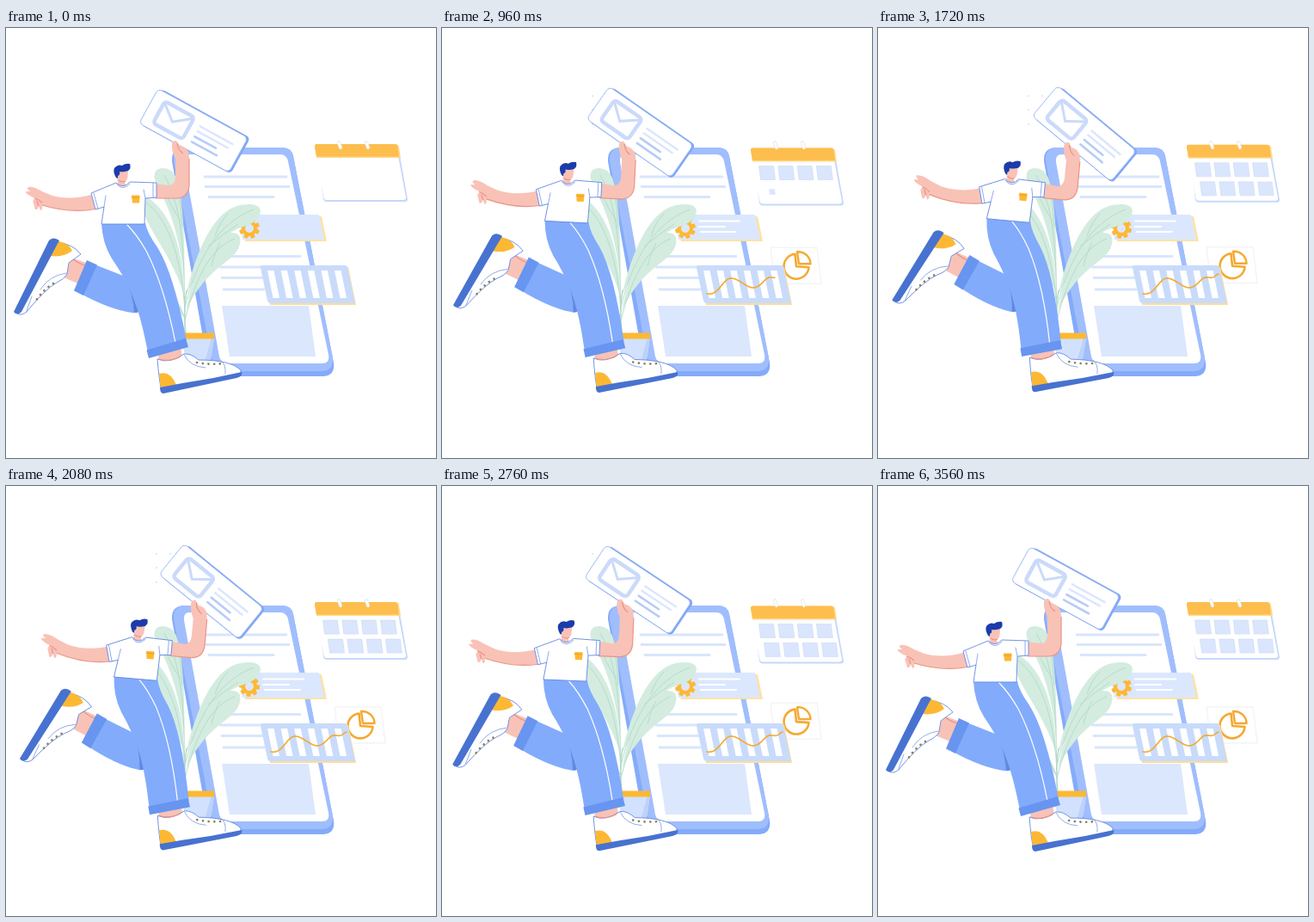
An HTML page that plays this animation: 500 px wide and 500 px high, repeating every 3.6 s.

```html
<!DOCTYPE html>
<html lang="en">
<head>
<meta charset="utf-8">
<title>Mobile planner</title>
<style>
html,body{margin:0;width:100%;height:100%;overflow:hidden;background:#fff}
svg{display:block;width:500px;height:500px}
.skin{fill:#f9c2b7}
.shade{fill:none;stroke:#ea9487;stroke-width:1.2}
.ink{stroke:#6489e2;stroke-width:.9;stroke-linejoin:round}
.white{fill:#fff}
.pants{fill:#82abfc}
.cuff{fill:#6795f0}
.sole{fill:#4872d0}
.gold{fill:#fdb833}
.line{fill:none;stroke-linecap:round}
.gold-line{fill:none;stroke:#f5a931;stroke-linejoin:round;stroke-linecap:round}
.leaf{fill:#d3ecdf}
.vein{fill:none;stroke:#b3dac9;stroke-width:.9}
.lace{fill:none;stroke:#8a7d57;stroke-width:2.6;stroke-linecap:round;stroke-dasharray:.1 6.6}
</style>
</head>
<body>
<svg viewBox="0 0 500 500">
  <!-- phone -->
  <path fill="#84abfa" d="M206 139H321Q332 139 334 149L381 389Q383 404 369 405H250Q237 405 235 394L193 155Q192 140 206 139Z"/>
  <path fill="#a0befd" d="M206 139H321Q332 139 334 149L380 384Q381 398 368 399H254Q242 399 240 388L195 155Q194 141 206 139Z"/>
  <path class="white" d="M212 147H319Q326 147 328 155L375 380Q377 390 367 390H258Q250 390 248 382L207 156Q206 148 212 147Z"/>
  <path class="line" stroke="#d9e5fc" stroke-width="2.8" d="M231 173H326M232 184.500H329M236 196.500H311M249 265.500H342M249 278H298M251 290.500H300M253 304H300"/>
  <path fill="#dbe7fd" d="M251 323H352L360 382H260Z"/>

  <!-- settings card -->
  <path fill="#ffe1a6" d="M272 219H367L373 248H278Z"/>
  <path fill="#dbe7fe" d="M270 217H364L370 246H275Z"/>
  <g id="notes" class="line" stroke="#fff" stroke-width="2.200"></g>
  <g id="gear"></g>

  <!-- pie card -->
  <g id="pie">
    <path class="white" stroke="#ececf1" stroke-width=".8" d="M382 257H436L441 299H387Z"/>
    <path class="gold-line" stroke-width="2.600" d="M410.500 264.500A14.500 14.500 0 1 0 426.500 280L412 279Z"/>
    <path class="gold-line" stroke-width="2.400" d="M413 262A14.500 14.500 0 0 1 428.500 276H415Z"/>
  </g>

  <!-- chart card -->
  <path fill="#ffdc98" d="M299 278H398L407 322H307Z"/>
  <path fill="#c9dbfb" d="M298 276H394Q396 276 397 278L406 320H307Q305 320 304 317L296 279Q296 276 298 276Z"/>
  <g id="bars" class="white"></g>
  <path id="curve" class="gold-line" stroke-width="1.700" pathLength="100" d="M308 309C323 312 326 290 337 291S353 303 363 302 375 288 384 290 391 287 396 286"/>

  <!-- calendar -->
  <g id="calendar">
    <path fill="#c7d8fb" d="M361 137H456L467 199Q467 202 464 202H373Q370 202 369 199Z"/>
    <path class="white" d="M360 149H456L465 197Q465 200 462 200H373Q370 200 369.500 197Z"/>
    <path fill="#ffd98f" d="M361 135H453Q456 135 457 138L459 151H361L359 138Q359 135 361 135Z"/>
    <path fill="#fdbe4d" d="M361 135H452Q455 135 455.500 138L457 149.500H361L359 138Q359 135 361 135Z"/>
    <g id="cells" fill="#dae6fd" stroke="#d0dcf5" stroke-width=".7"></g>
  </g>
  <path class="line" stroke="#e8e3da" stroke-width="4.200" d="M387 133.500L389 139M419 133.500L421 139"/>
  <path class="line" stroke="#fff" stroke-width="2.800" d="M387 133.500L389 139M419 133.500L421 139"/>

  <!-- plant -->
  <path class="leaf" d="M208 300C207 275 209 205 198 174Q191 160 177 164Q169 169 175 181C188 207 202 235 208 300Z"/>
  <path class="leaf" d="M207 310C207 262 193 216 166 198Q157 194 158 206C162 232 192 262 207 310Z"/>
  <path class="leaf" d="M208 338C204 322 199 314 188 306Q183 307 187 314C191 322 201 328 208 338Z"/>
  <path class="leaf" d="M209 312C220 262 241 212 272 206Q295 202 296 213Q294 226 276 231C250 239 231 264 209 312Z"/>
  <path class="leaf" d="M209 330C219 280 232 244 260 238Q275 237 272 251C267 274 234 274 209 330Z"/>
  <path class="vein" d="M208 355C207 270 208 215 184 171M208 330C204 260 186 220 163 203M208 338Q200 317 188 308M208 325C222 265 250 225 288 211M208 340C222 285 240 255 266 245M243 242Q248 226 258 216M235 254Q252 240 270 228M239 277Q243 260 249 250M204 232Q205 210 201 196M203 224Q192 208 187 195"/>
  <path class="line" stroke="#b3dac9" stroke-width="1.400" d="M209 356Q206 325 210 305"/>
  <path fill="#d2e1fd" d="M204 360H242L237 392H210Z"/>
  <path fill="#bdd2fb" d="M239 360H242L237 392H230Z"/>
  <path class="gold" d="M201 354.500H242V361.500H203Z"/>

  <g id="dots" fill="#a9bce8"></g>

  <g id="body">
    <!-- trailing leg -->
    <g id="trail">
      <path class="skin" d="M76 267L96 274 88 299 67 290Z"/>
      <path class="shade" d="M76 267Q82 273 94 277"/>
      <path class="pants" d="M103 275L136 288 152 304 156 324Q156 333 146 331Q120 327 87 309Z"/>
      <path fill="#6089df" d="M138 289L152 303 156 324Q156 332 149 331Q148 310 138 289Z"/>
      <path class="cuff" d="M94 270L106 275.500 90 311 79 305.500Z"/>
      <path class="white ink" d="M59 249Q78 251 87 263L73 273 71 286Q68 292 59 296Q45 304 24 330Q18 335 13 332Z"/>
      <path class="gold" d="M61 248Q73 250 77 259Q67 267 52 265Z"/>
      <path class="sole" d="M50 247Q55 242 62 247L18 330Q13 335 9 330Z"/>
      <path class="lace" d="M55 297Q42 305 33 320"/>
      <path class="line" stroke="#6489e2" stroke-width=".7" d="M70 285Q50 288 40 304M24 329L30 312"/>
    </g>

    <!-- mail card -->
    <g id="mail">
      <rect x="-57" y="-24.500" width="118.500" height="48" rx="5" fill="#82a8f4"/>
      <rect x="-60" y="-23" width="119" height="46" rx="5" class="white" stroke="#8fb0f5" stroke-width=".8"/>
      <rect x="-46" y="-14" width="39" height="29" rx="4" fill="none" stroke="#cbdafa" stroke-width="4.500"/>
      <path class="line" stroke="#cbdafa" stroke-width="3" d="M-44-11L-27 3-9-11"/>
      <path class="line" stroke="#dce7fd" stroke-width="2.500" d="M4-8H47M4-1.500H44"/>
      <path class="line" stroke="#b7ccf6" stroke-width="2.600" d="M4 5.500H32M4 12.500H37"/>
    </g>

    <!-- arms -->
    <path class="skin" d="M102 193Q76 201 54 195L42 190Q32 184 26 185Q23 186 28 190L23 190Q22 193 34 198Q30 201 32 204L34 211Q37 212 38 207L40 212Q43 212 42 206Q75 216 106 210Z"/>
    <path class="shade" d="M104 210.500Q75 216 42 206M33 198Q38 199 42 203M38 207L36 201"/>
    <path class="skin" d="M172 181L190 183Q197 182 197 172V152Q192 142 193 134Q196 129 199 132Q202 138 204 137Q213 140 213 151V183Q212 197 199 198H172Z"/>
    <path class="shade" d="M213 152V183Q212 197 199 198H174M199 134Q200 142 206 146"/>

    <!-- head -->
    <path class="skin" d="M129 165H142L141.500 173Q141 178 138 178L139 183Q134 187 130 182Z"/>
    <path class="shade" d="M131 177Q135 180 139 178"/>
    <path fill="#1b3cab" d="M128 174Q124 167 126 163Q130 158 135 160Q139 157 144 158Q146 163 142 166Q136 168 132 167Q133 171 130 172V175Z"/>

    <!-- leading leg -->
    <g id="foot">
      <path class="skin" d="M178 374L203 370 205 383Q190 392 177 387Z"/>
      <path class="white ink" d="M176 385Q190 391 207 379Q215 378 224 386Q262 386 273 398V403L181 423Q178 410 176 385Z"/>
      <path class="gold" d="M178 402Q191 398 198 415L180 419Z"/>
      <path class="sole" d="M179 418L205 413Q240 408 274 400Q276 405 268 407L183 425Q179 425 179 418Z"/>
      <path class="lace" d="M222 389Q238 392 252 390"/>
      <path class="line" stroke="#6489e2" stroke-width=".7" d="M207 380Q214 394 232 395M250 387Q256 391 255 402"/>
      <path class="shade" d="M178 385Q190 389 203 382"/>
    </g>
    <path class="pants" d="M111 227H162Q164 238 176 255Q195 285 210 364L165 377C155 325 145 300 123 268Q112 250 111 227Z"/>
    <path class="line" stroke="#fff" stroke-width="1.200" d="M141 229Q152 240 163 259Q184 300 197 366"/>
    <path class="cuff" d="M163.500 374.500L209 361 212 371 166 384Z"/>

    <!-- shirt -->
    <path class="white ink" d="M128 180L99 192 104 211 114 208 111 228H161L162 198 175 197V180L144 179Q136 188 128 180Z"/>
    <path class="line" stroke="#6489e2" stroke-width=".7" d="M129 182Q136 190 144 181M114 208L116 195M162 198L160 188M102 192L107 210M171 180.500L171 197"/>
    <path class="gold" d="M146 194.500H155.500L155 203.500H147Z"/>
    <path class="line" stroke="#e79a1d" stroke-width=".8" d="M146 197H155"/>
  </g>
</svg>
<script>
const LOOP = 3600, TICK = 40, TAU = Math.PI * 2;
// Turning points of the floating cards: rest, peak, rest, peak, rest.
const CALENDAR_TURNS = [0, 1000, 2000, 2840, LOOP];
const PIE_TURNS = [700, 1350, 2050, 2840, LOOP];
const $ = id => document.getElementById(id);

function add(parent, tag, attrs) {
  const el = document.createElementNS('http://www.w3.org/2000/svg', tag);
  for (const k in attrs) el.setAttribute(k, attrs[k]);
  return $(parent).appendChild(el);
}
const move = (id, value) => $(id).setAttribute('transform', value);
const span = (t, start, length) => Math.min(1, Math.max(0, (t - start) / length));
const ease = x => x * x * (3 - 2 * x);

// 0 at rest, 1 at a peak
function bob(t, turns) {
  const next = turns.findIndex(turn => turn > t);
  if (next < 1) return 0;
  const x = (t - turns[next - 1]) / (turns[next] - turns[next - 1]);
  return (1 - Math.cos(Math.PI * (next - 1 + x))) / 2;
}

for (let i = 0; i < 6; i++)
  add('bars', 'path', { d: `M${304 + i * 15.6} 282h7.500l6.500 32h-7.500z` });

for (const x of [175, 191])
  for (const y of [79, 95, 112]) add('dots', 'circle', { cx: x, cy: y, r: .7 });

for (let i = 0; i < 8; i++)
  add('gear', 'rect', { x: -2.5, y: -12, width: 5, height: 6, rx: 1, class: 'gold', transform: `rotate(${i * 45 + 22.5})` });
add('gear', 'circle', { r: 7, fill: '#dbe7fe', stroke: '#fdb833', 'stroke-width': 4 });

const cells = Array.from({ length: 8 }, (_, i) => {
  const row = i >> 2;
  return { x: 378 + (i % 4) * 22.3 + row * 6, y: 164 + row * 22, el: add('cells', 'path', { d: 'M-9.500-8H7.500L9.500 8H-7.500Z' }) };
});

const notes = [[299, 224.5, 47], [299, 231, 30], [301, 237, 41]]
  .map(([x, y, w]) => ({ x, y, w, el: add('notes', 'path', {}) }));

function draw(t) {
  const p = (1 - Math.cos(TAU * t / LOOP)) / 2, lean = 5.2 * p;
  move('body', `rotate(${lean} 188 395)`);
  move('mail', `translate(${218.5 - 3 * p} 119.500) rotate(${28.7 + 5.8 * p})`);
  move('trail', `translate(${p} ${2 * p})`);
  move('foot', `rotate(${-lean} 188 395) rotate(${1.1 * p} 270 402)`);
  move('gear', `translate(283 233) rotate(${360 * t / LOOP})`);

  move('calendar', `translate(0 ${4.5 * bob(t, CALENDAR_TURNS)})`);
  cells.forEach(({ x, y, el }, i) => {
    el.setAttribute('transform', `translate(${x} ${y}) scale(${ease(span(t, i * 215, 240))})`);
  });
  notes.forEach(({ x, y, w, el }, i) => {
    const grow = span(t, 60 + i * 160, 640);
    el.setAttribute('d', grow ? `M${x} ${y}h${w * ease(grow)}` : '');
  });

  const drawn = span(t, 0, 1070);
  $('curve').setAttribute('stroke-dasharray', `${100 * drawn} 200`);
  $('curve').setAttribute('opacity', drawn ? 1 : 0);

  const pop = ease(span(t, 240, 560));
  move('pie', `translate(412 ${278 - 5 * bob(t, PIE_TURNS)}) scale(${pop}) translate(-412 -278)`);
}

let origin;
function frame(now) {
  origin ??= now;
  draw(Math.floor((now - origin) % LOOP / TICK) * TICK);
  requestAnimationFrame(frame);
}
draw(0);
requestAnimationFrame(frame);
</script>
</body>
</html>
```
